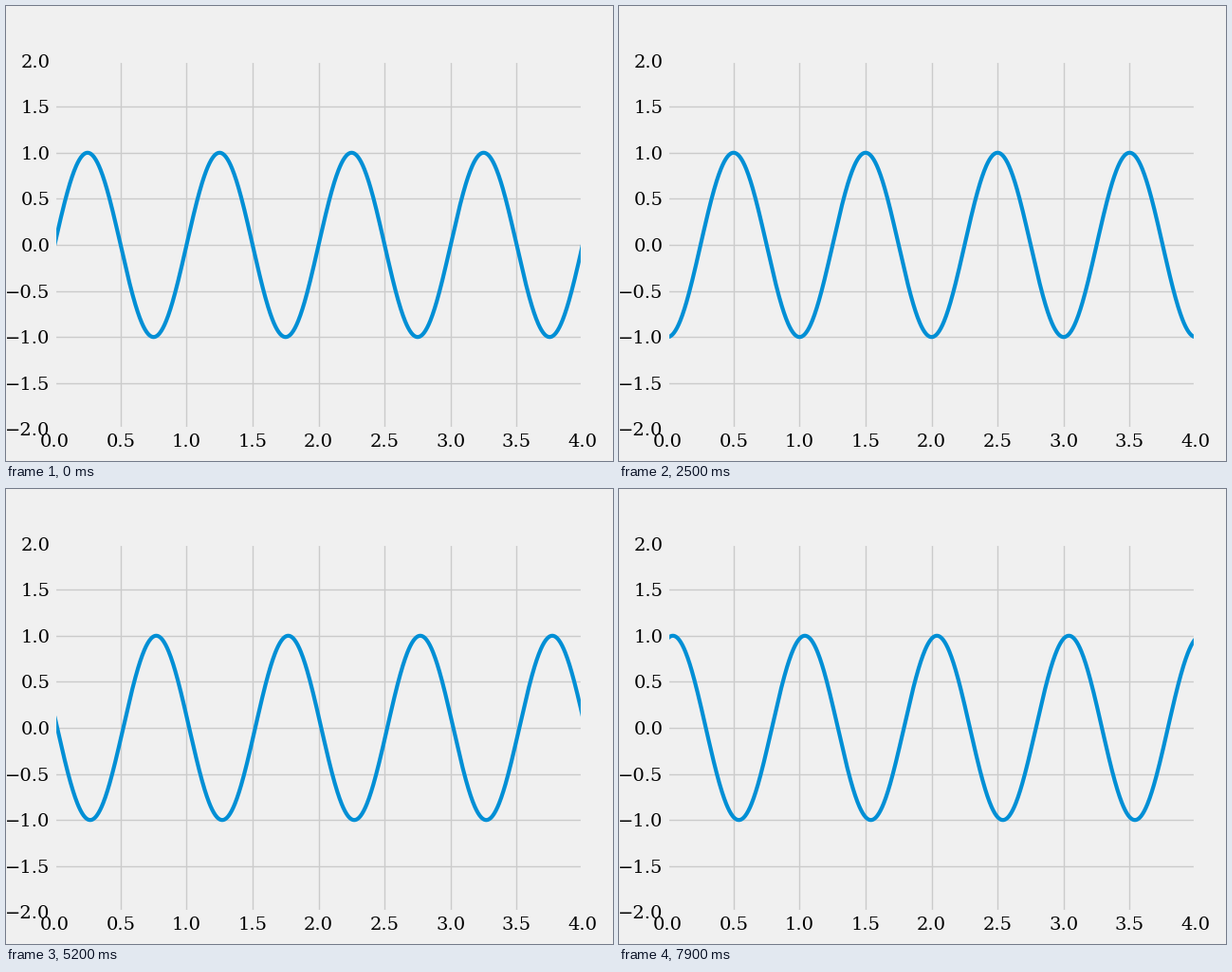
Write a matplotlib script that moves like this. It is 640 px wide and 480 px high and loops after 8000 ms.

```python
import numpy as np
import matplotlib.pyplot as plt
from matplotlib.animation import FuncAnimation

FRAMES = 80
INTERVAL = 100  # ms
SHIFT = 0.01    # wave travel per frame, in x units

plt.style.use("fivethirtyeight")
plt.rcParams["font.family"] = "DejaVu Serif"

fig = plt.figure(figsize=(6.4, 4.8), dpi=100)
ax = fig.add_subplot(xlim=(0, 4), ylim=(-2, 2))

x = np.linspace(0, 4, 1000)
line, = ax.plot(x, np.sin(2 * np.pi * x), lw=3)


def update(i):
    line.set_ydata(np.sin(2 * np.pi * (x - SHIFT * i)))
    return line,


anim = FuncAnimation(fig, update, frames=FRAMES, interval=INTERVAL,
                     repeat=True, repeat_delay=0, blit=False)
plt.show()
```
